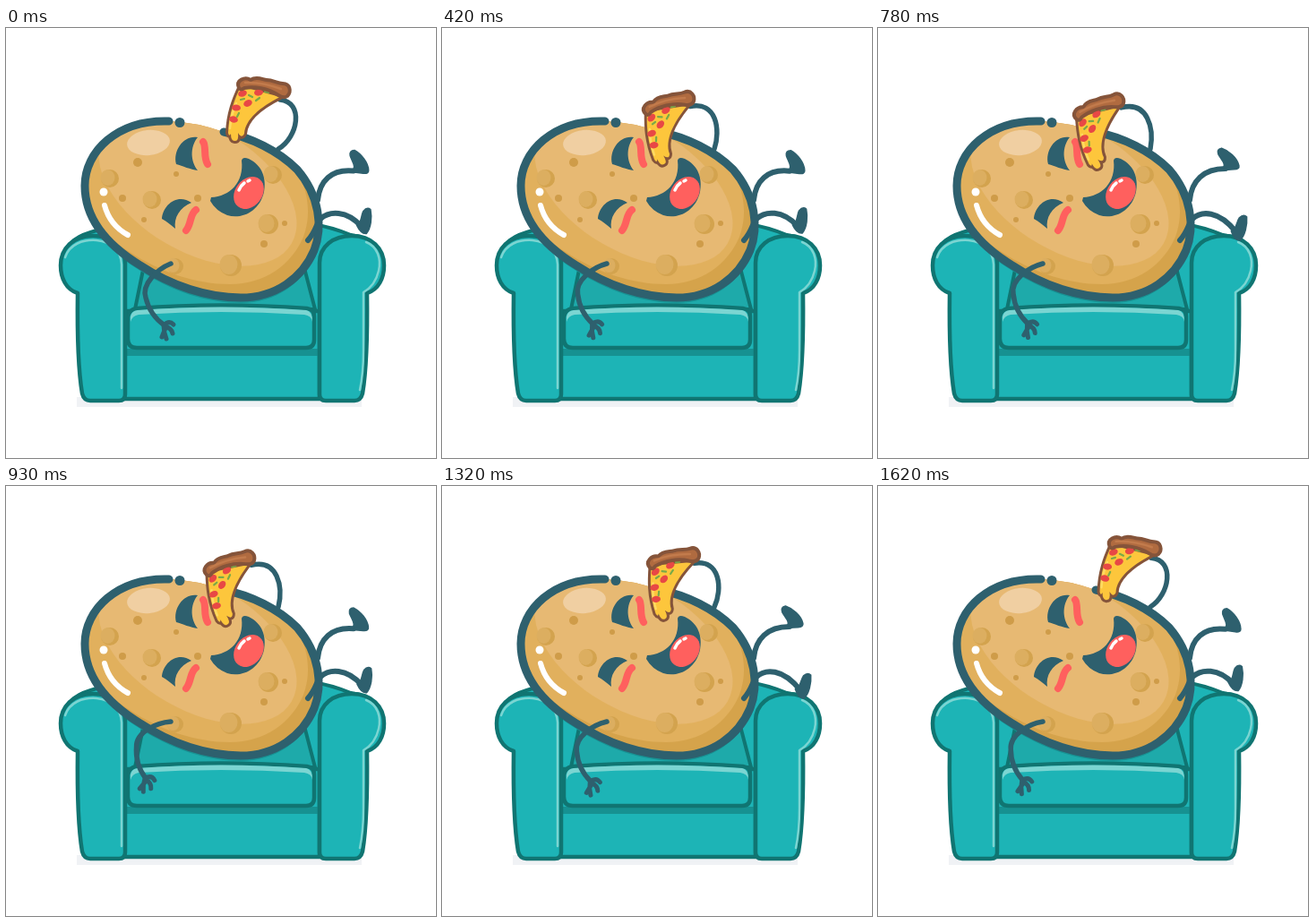
An HTML page with a canvas that plays this animation: 480x480 px, repeating every 1650 ms.

```html
<!DOCTYPE html>
<html lang="en">
<head>
<meta charset="utf-8">
<title>Couch potato</title>
<style>
html, body { margin: 0; width: 100%; height: 100%; overflow: hidden; background: #fff; }
canvas { display: block; width: 480px; height: 480px; }
</style>
</head>
<body>
<canvas id="stage" width="480" height="480"></canvas>
<script>
const ctx = document.getElementById('stage').getContext('2d');
const LOOP = 1650, STEP = 30;
const INK = '#2e606e', TEAL = '#1db4b6', EDGE = '#107572', GLOW = '#7bd5d2', RED = '#ff605e';
const RAD = Math.PI / 180;

// The outline is open at the top; the body closes the gap.
const OUTLINE = 'M182 104C124 102 88 138 88 176C88 215 114 243 150 265C185 288 225 301 262 301C301 301 331 279 344 248C354 222 350 187 325 158C304 137 273 122 243 116';
const BODY = OUTLINE + 'Q212 105 182 104Z';

function shape(d, fill, stroke, width) {
  const path = new Path2D(d);
  if (fill) { ctx.fillStyle = fill; ctx.fill(path); }
  if (stroke) { ctx.strokeStyle = stroke; ctx.lineWidth = width; ctx.stroke(path); }
}
const line = (d, color, width) => shape(d, null, color, width);

function oval(x, y, rx, ry, color, angle = 0) {
  ctx.fillStyle = color;
  ctx.beginPath();
  ctx.ellipse(x, y, rx, ry, angle * RAD, 0, 7);
  ctx.fill();
}

// Draw with a turn about (x, y), then an offset.
function turned(x, y, angle, dx, dy, draw) {
  ctx.save();
  ctx.translate(x + dx, y + dy);
  ctx.rotate(angle * RAD);
  ctx.translate(-x, -y);
  draw();
  ctx.restore();
}
const bodyShade = (dx, dy, color) => turned(0, 0, 0, dx, dy, () => shape(BODY, color));

// Smooth Hermite curve through [time, value] pairs, at rest at both ends.
function track(keys, t) {
  let i = 0;
  while (i < keys.length - 2 && t >= keys[i + 1][0]) i++;
  const slope = k => {
    const a = keys[k - 1], b = keys[k + 1];
    return a && b ? (b[1] - a[1]) / (b[0] - a[0]) : 0;
  };
  const [t0, v0] = keys[i], [t1, v1] = keys[i + 1];
  const d = t1 - t0, u = (t - t0) / d, s = u * u * (3 - 2 * u);
  return v0 + (v1 - v0) * s + d * u * (1 - u) * (slope(i) * (1 - u) - slope(i + 1) * u);
}

const BITE = [[0, 0], [180, .42], [420, .83], [680, 1], [930, .92], [1320, .7], [1620, .03], [1650, 0]];
const SWING = [[0, 0], [180, 11], [420, 7], [660, 0], [930, 18], [1320, 9], [1650, 13]];

function sofaArm() {
  shape('M133 262V409Q133 416 126 416H94Q87 416 85 408Q79 372 80 296C67 292 61 279 61 265C61 246 75 232 97 232C118 232 133 244 133 262Z',
    TEAL, EDGE, 4.5);
}

function sofa() {
  ctx.fillStyle = '#f0f2f5';
  ctx.fillRect(79, 412, 318, 11);
  shape('M64 252C72 234 87 229 113 223L140 219H343Q362 222 385 231C405 234 415 243 420 256L350 330H132Z', TEAL, EDGE, 4);
  shape('M153 270L144 314H345L333 268Z', '#1eaaaa', EDGE, 4);
  bodyShade(0, 6, '#179394');
  shape('M132 316H350V414H132Z', TEAL, EDGE, 4.5);
  ctx.fillStyle = '#169191';
  ctx.fillRect(134, 358, 214, 8);
  shape('M146 313Q240 306 336 313Q344 314 344 322V348Q344 357 335 357H146Q136 357 136 347V323Q137 314 146 313Z', TEAL, EDGE, 4.5);
  shape('M139 328V322Q140 316 147 315Q240 308 335 315Q342 316 342 328Q341 321 333 320Q240 314 148 320Q141 321 139 328Z', GLOW);
  sofaArm();
  ctx.save();
  ctx.translate(483, 0);
  ctx.scale(-1, 1);
  sofaArm();
  ctx.restore();
  line('M66 256C71 241 86 236 101 237C118 239 128 248 129 264V402', GLOW, 2.5);
  line('M402 239C415 244 419 258 416 271C413 284 406 291 399 295V360Q399 385 395 404', GLOW, 2.5);
}

function spot(x, y, r) {
  oval(x, y, r, r, '#d3a34e');
  oval(x - 2.5, y - 1, r - 2, r - 1, '#dcae60');
}

function potato() {
  ctx.save();
  ctx.clip(new Path2D(BODY));
  shape(BODY, '#d5a34b');
  bodyShade(-12, -15, '#e1b05d');
  oval(214, 180, 121, 70, '#e7b973', 30);
  oval(159, 128, 24, 14, '#f0cfa2', -6);
  [[116, 168, 10], [163, 192, 10], [293, 219, 11], [298, 164, 10], [189, 266, 9], [251, 265, 12]]
    .forEach(s => spot(...s));
  [[147, 150, 5], [190, 163, 3], [130, 190, 4], [154, 214, 3], [288, 241, 4], [311, 218, 3], [214, 190, 4]]
    .forEach(([x, y, r]) => oval(x, y, r, r, '#cf9c49'));
  ctx.restore();

  line(OUTLINE, INK, 9);
  line('M337 237Q343 230 347 220', INK, 6);
  oval(194, 105.5, 5.5, 5.5, INK);
  oval(109, 183, 4.5, 4.5, '#fff');
  line('M110 198C114 213 123 224 136 231', '#fff', 6);
}

function face() {
  shape('M214 122C199 119 186 136 190 152C197 154 206 158 214 159C206 149 205 133 214 122Z', INK);
  shape('M207 195C192 184 175 197 174 213C180 216 184 220 189 224C187 212 194 200 207 195Z', INK);
  line('M220 127C224 132 220 144 225 152', RED, 8);
  line('M212 203C205 208 207 219 201 226', RED, 8);
  shape('M229 189C250 188 266 172 263 148Q264 143 271 146C286 153 291 168 288 183C283 205 263 214 247 209Q234 204 228 193Z', INK);
  oval(271, 184, 19.5, 15, RED, -52);
  line('M260 181Q262 176 266 173M270 171L272 170', '#fff', 3.5);
}

function legs(sway) {
  const lift = (1 - sway) / 2;
  line(`M348 192C350 171 363 157 388 ${160 - 3 * lift}`, INK, 6);
  turned(388, 159, -12 * lift, -2 * lift, -3 * lift, () =>
    shape('M385 161C393 156 387 150 385 143Q384 137 390 137C397 141 405 151 405 160Q405 164 399 163Z', INK, INK, 1.5));
  line(`M351 213C361 204 380 203 ${396 + 4 * lift} ${220 + 8 * lift}`, INK, 6);
  turned(399, 214, 8 * lift, 4 * lift, 9 * lift, () =>
    shape('M391 219C397 216 395 209 398 203Q402 198 406 201C408 210 407 222 402 228Q396 229 391 219Z', INK, INK, 1.5));
}

function restingArm(angle) {
  turned(184, 263, angle, 0, 0, () => {
    line('M184 263C169 269 151 286 156 301C159 314 167 325 177 332', INK, 5.5);
    line('M176 332Q182 326 187 331M177 333Q185 335 186 341M176 332Q176 340 179 347M174 345L178 335', INK, 5);
  });
}

function pizza() {
  const slice = 'M262 65C255 80 249 95 248 117Q249 122 251 118Q251 127 256 126Q260 126 259 117Q263 124 266 118C267 102 284 88 306 77Z';
  shape(slice, '#fdc63c', '#85543a', 6);
  shape(slice, '#fdc63c');
  line('M257 84Q251 97 250 112', '#ffda62', 2.5);
  [[264, 73, -20], [282, 72, -8], [270, 84, -25], [257, 89, 5], [254, 102, 15]]
    .forEach(([x, y, a]) => oval(x, y, 5, 3.6, '#e84845', a));
  line('M271 75L275 77M262 80L266 79M279 81L283 78M260 95L258 99M289 71L293 72', '#78aa48', 2.2);
  shape('M260 67C256 58 267 54 273 58C280 53 287 58 291 58C298 58 303 62 309 62C317 62 319 71 314 76Q310 79 304 75C292 67 277 65 266 67Q262 70 260 67Z',
    '#b06b40', '#85543a', 4);
  line('M267 61Q286 60 307 68', '#c27b4c', 2.5);
}

function pizzaArm(p) {
  const mix = (a, b) => a + (b - a) * p;
  line(`M304 135C${mix(326, 308)} ${mix(122, 112)} ${mix(333, 301)} ${mix(83, 81)} ${mix(306, 271)} ${mix(80, 89)}`, INK, 5.5);
  turned(283, 96, -29 * p, -27 * p, 21 * p, pizza);
}

function render(t) {
  const sway = Math.cos(2 * Math.PI * (3 * t / LOOP - .87));
  ctx.fillStyle = '#fff';
  ctx.fillRect(0, 0, 480, 480);
  ctx.lineCap = ctx.lineJoin = 'round';
  sofa();
  legs(sway);
  potato();
  face();
  restingArm(track(SWING, t));
  pizzaArm(track(BITE, t));
}

const start = performance.now();
function tick() {
  const t = (performance.now() - start) % LOOP;
  render(Math.floor(t / STEP) * STEP);
  requestAnimationFrame(tick);
}
tick();
</script>
</body>
</html>
```
